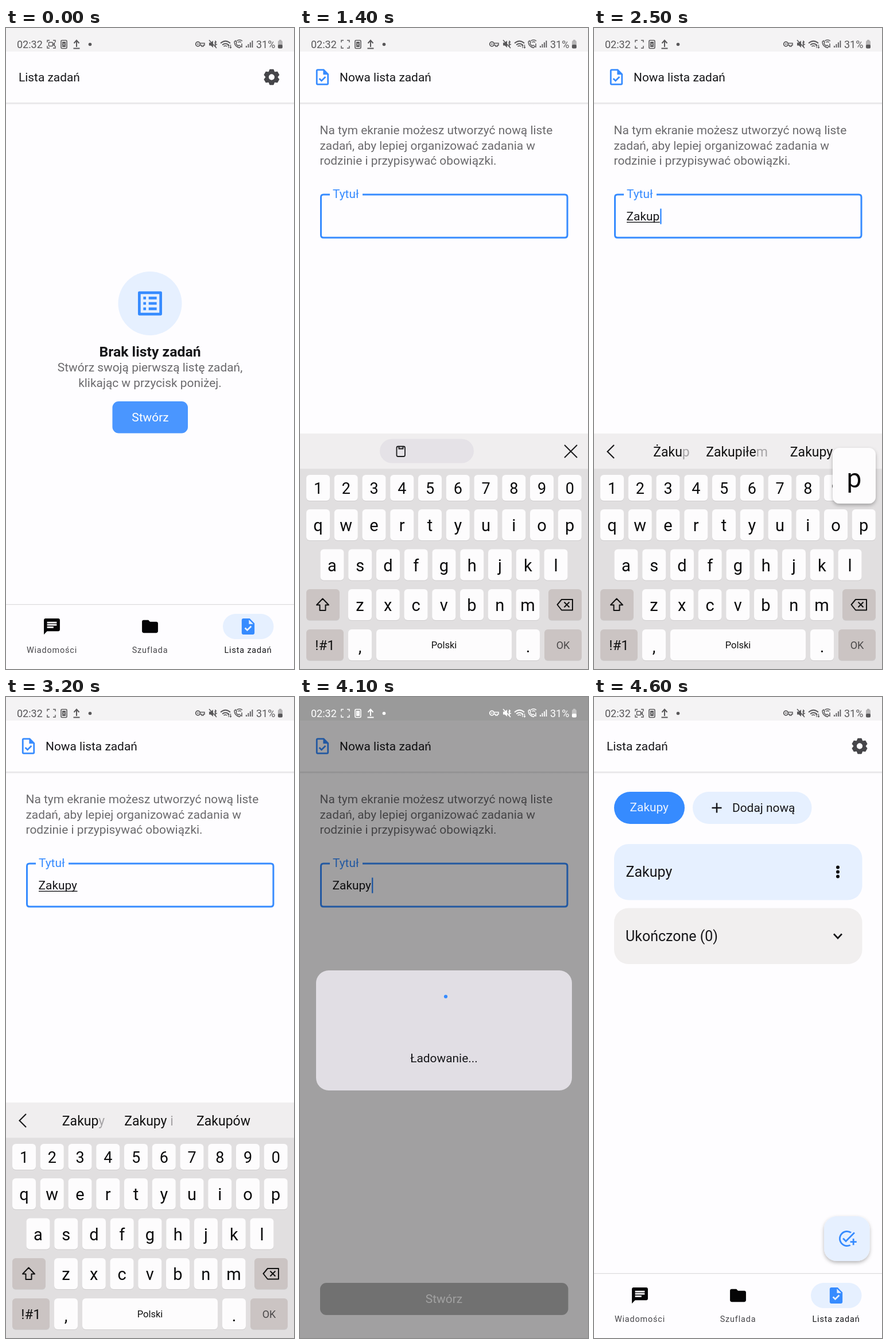
Animation of 502x1116 px, one loop 5.1 s. Source, as an HTML page:

```html
<!DOCTYPE html>
<html lang="pl">
<head>
<meta charset="utf-8">
<title>Lista zadań</title>
<style>
html, body { margin: 0; width: 100%; height: 100%; overflow: hidden; background: #fefdff; }
svg { display: block; width: 502px; height: 1116px; font-family: Roboto, sans-serif; }
</style>
</head>
<body>
<svg id="stage" viewBox="0 0 502 1116" xmlns="http://www.w3.org/2000/svg"></svg>
<script>
const LOOP = 5100;
const BLUE = '#368bff', PALE = '#e6f0ff', INK = '#17171a', PAPER = '#fefdff';

const rect = (x, y, w, h, r, fill, extra = '') =>
  `<rect x="${x}" y="${y}" width="${w}" height="${h}" rx="${r}" fill="${fill}" ${extra}/>`;
const text = (s, x, y, size, fill = INK, anchor = 'start', extra = '') =>
  `<text x="${x}" y="${y}" font-size="${size}" fill="${fill}" text-anchor="${anchor}" ${extra}>${s}</text>`;
const line = (d, width, stroke, extra = '') =>
  `<path d="${d}" fill="none" stroke="${stroke}" stroke-width="${width}" ${extra}/>`;
const icon = (d, cx, cy, fill, k = 1.394) =>
  `<path d="${d}" fill="${fill}" fill-rule="evenodd" transform="translate(${cx} ${cy}) scale(${k}) translate(-12 -12)"/>`;
const group = (id, body, extra = '') => `<g id="${id}" ${extra}>${body}</g>`;

const ICON = {
  chat: 'M20 2H4c-1.1 0-2 .9-2 2v18l4-4h14c1.1 0 2-.9 2-2V4c0-1.1-.9-2-2-2zM6 9h12v2H6zM14 14H6v-2h8zM18 8H6V6h12z',
  folder: 'M10 4H4c-1.1 0-2 .9-2 2v12c0 1.1.9 2 2 2h16c1.1 0 2-.9 2-2V8c0-1.1-.9-2-2-2h-8z',
  task: 'M14 2H6c-1.1 0-2 .9-2 2v16c0 1.1.9 2 2 2h12c1.1 0 2-.9 2-2V8zM10.94 18 7.4 14.46l1.41-1.41 2.12 2.12 4.24-4.24 1.41 1.41zM13 9V3.5L18.5 9z',
  taskLine: 'M14 2H6c-1.1 0-2 .9-2 2v16c0 1.1.9 2 2 2h12c1.1 0 2-.9 2-2V8zM18 20H6V4h7v5h5zM8.82 13.05 7.4 14.46 10.94 18l5.66-5.66-1.41-1.41-4.24 4.24z',
  list: 'M3.9 3h16.2q.9 0 .9.9v16.2q0 .9-.9.9H3.9q-.9 0-.9-.9V3.9q0-.9.9-.9zM5 5v14h14V5zM11 7h6v2h-6zM11 11h6v2h-6zM11 15h6v2h-6zM7 7h2v2H7zM7 11h2v2H7zM7 15h2v2H7z',
  addTask: 'M22 5.18 10.59 16.6l-4.24-4.24 1.41-1.41 2.83 2.83 10-10zM12 20a8 8 0 1 1 4.28-14.75l1.45-1.45A10 10 0 1 0 16.78 20.78l-1.5-1.5c-1 .46-2.11.72-3.28.72zM19 15h-3v2h3v3h2v-3h3v-2h-3v-3h-2z'
};

function gear(cx, cy) {
  const teeth = [...Array(6).keys()].map(i =>
    `<path d="M-5.4-7-3-13H3L5.4-7Z" transform="rotate(${i * 60})"/>`).join('');
  return `<g transform="translate(${cx} ${cy})" fill="#46464a" stroke="#46464a" stroke-width="1.4" stroke-linejoin="round">
    ${teeth}<circle r="7.6" fill="none" stroke-width="5.4"/><circle r="4.9" fill="${PAPER}" stroke="none"/></g>`;
}

const header = rect(0, 0, 502, 1116, 0, PAPER) + rect(0, 0, 502, 41, 0, '#f4f3f4') +
  rect(0, 130, 502, 5, 0, 'url(#shade)');

function statusBar() {
  const c = 'currentColor';
  const corners = 'M72 25V21.500H76M82 21.500H86V25M86 31V35H82M76 35H72V31';
  const bars = [0, 1, 2, 3].map(i => rect(418 + i * 3.5, 31 - i * 3, 1.8, 3 + i * 3, 0, c)).join('');
  return text('02:32', 19, 34.5, 18, c) + line(corners, 1.4, c) +
    group('camera', rect(74.500, 25, 7, 6.500, 1, 'none', `stroke="${c}" stroke-width="1.4"`) +
      line('M82 28.500 84.500 26V31Z', 1.2, c)) +
    rect(96, 21.500, 10, 14, 1.5, 'none', `stroke="${c}" stroke-width="1.6"`) +
    rect(98, 24, 6, 9, 0, c) + line('M99.500 26.500 102.500 30.500M102.500 26.500 99.500 30.500', 1, '#ddd') +
    line('M123 33V23M118.500 26.500 123 21.500 127.500 26.500M117.500 35.500H128.500', 2, c) +
    `<circle cx="146.500" cy="28.500" r="2.8" fill="${c}"/>` +
    `<circle cx="334.500" cy="28" r="3.8" fill="none" stroke="${c}" stroke-width="1.8"/>` +
    `<circle cx="334.500" cy="28" r="1.2" fill="${c}"/>` + line('M338 26.500H346V30H344V32H341V30H338', 1.5, c) +
    `<path d="M354 25.500H357L361 22V34L357 30.500H354Z" fill="${c}"/>` +
    line('M354 21 367 35M363.500 26 367 24M363.500 28.500H368M365 22V33', 1.6, c) +
    line('M374 26.500Q382.500 19 391 26.500M377 29.500Q382.500 25 388 29.500M379.500 32Q382.500 30 385 32', 1.7, c) +
    line('M388 35V29M386.500 31 388 29 389.500 31M391.500 29V35M390 33 391.500 35 393 33', 1.1, c) +
    line('M398 24Q398 32 407 34.500L409.500 32 406.500 30 404.500 31Q402 29.500 401 27L402 25 400 22Z', 1.5, c, 'stroke-linejoin="round"') +
    line('M402 22.500Q407 19 412 22.500M404.500 25Q407 23 410 25M411 27V34', 1.5, c) + bars +
    text('31%', 436, 34.5, 18, c) +
    rect(474, 22, 8, 13.500, 2, c, 'opacity=".4"') + rect(476, 20.500, 4, 2, .5, c, 'opacity=".4"') +
    rect(474, 29, 8, 6.500, 2, c);
}

const navItem = (d, label, cx, fill, ink) => icon(d, cx, 1042, fill) +
  text(label, cx, 1088, 14.4, ink, 'middle', 'letter-spacing=".85"');

const listScreen = header + text('Lista zadań', 22, 93, 20.9) + gear(463, 85.5) +
  group('empty',
    `<circle cx="251" cy="479.500" r="55.500" fill="${PALE}"/>` + icon(ICON.list, 251, 479.5, BLUE, 2.33) +
    text('Brak listy zadań', 251, 572, 24.8, INK, 'middle', 'font-weight="700"') +
    text('Stwórz swoją pierwszą listę zadań,', 251, 598, 20.9, '#6b6a6d', 'middle') +
    text('klikając w przycisk poniżej.', 251, 624.5, 20.9, '#6b6a6d', 'middle') +
    rect(185.5, 650, 131.5, 55.5, 11, BLUE) + rect(185.5, 650, 131.5, 55.5, 11, '#fff', 'id="tapFirst"') +
    text('Stwórz', 251.5, 685, 20.9, '#fff', 'middle')) +
  group('lists',
    rect(35, 165, 123, 56, 28, BLUE) + text('Zakupy', 62.5, 199, 20.9, '#eaf2ff') +
    rect(172, 165, 207.5, 56, 28, PALE) + line('M205.500 193H222.500M214 184.500V201.500', 2.5, INK) +
    text('Dodaj nową', 241, 200, 20.9) +
    rect(35, 256, 432.5, 97.5, 25, PALE) + text('Zakupy', 55.5, 313, 25) +
    [296.500, 304.500, 312.500].map(y => `<circle cx="425" cy="${y}" r="3" fill="#0c0c0e"/>`).join('') +
    rect(35, 367.5, 432.5, 97.5, 25, '#f1efef') + text('Ukończone (0)', 55, 425, 25) +
    line('M418 412.500 425 420 432 412.500', 2.7, INK)) +
  group('fab', rect(401, 904, 79.5, 78, 22, PALE, 'filter="url(#lift)"') + icon(ICON.addTask, 441, 943, BLUE)) +
  rect(0, 1003, 502, 1.3, 0, '#dddcde') +
  navItem(ICON.chat, 'Wiadomości', 80, '#050506', '#47464a') +
  navItem(ICON.folder, 'Szuflada', 251, '#050506', '#47464a') +
  rect(378, 1020, 88.5, 44, 22, PALE) + navItem(ICON.task, 'Lista zadań', 422, BLUE, INK);

const intro = ['Na tym ekranie możesz utworzyć nową liste', 'zadań, aby lepiej organizować zadania w',
  'rodzinie i przypisywać obowiązki.'];
const formScreen = header + icon(ICON.taskLine, 39, 85.5, BLUE) + text('Nowa lista zadań', 69, 93, 20.9) +
  intro.map((s, i) => text(s, 34.5, 185 + i * 26.5, 20.9, '#6b6a6d')).join('') +
  line('M52 290H41Q36.500 290 36.500 294.500V360.500Q36.500 365 41 365H461.500Q466 365 466 360.500V294.500Q466 290 461.500 290H109', 3, BLUE) +
  text('Tytuł', 57, 296, 20.9, BLUE) + text('', 56.5, 335, 20.9, INK, 'start', 'id="title"') +
  rect(57, 337.5, 0, 1.4, 0, INK, 'id="underline"') + rect(0, 314.5, 2.4, 27, 0, BLUE, 'id="caret"') +
  rect(35, 1020, 432.5, 56, 11, BLUE, 'id="create"') + rect(35, 1020, 432.5, 56, 11, '#fff', 'id="tapCreate"') +
  text('Stwórz', 251, 1055, 20.9, '#fff', 'middle');

const STEP = 48.75, GREY_KEY = '#cbc4c3';
const rows = [['1234567890', 11, 778, 45], ['qwertyuiop', 11, 838, 54],
  ['asdfghjkl', 35.5, 907.5, 54], ['zxcvbnm', 84, 977, 54]];
const keyPlace = {};
const key = (x, y, w, h, fill = '#fdfcfd') =>
  rect(x, y + 1, w, h, 6, '#cfcdce') + rect(x, y, w, h, 6, fill);
function keyboard() {
  const letters = rows.map(([chars, x0, y, h], r) => [...chars].map((c, i) => {
    const x = x0 + STEP * i;
    keyPlace[c] = [x, y];
    return key(x, y, 41, h) + text(c, x + 20.5, y + (r ? 38 : 33), r ? 29 : 27, '#0b0b0c', 'middle', `class="letter" data-c="${c}"`);
  }).join('')).join('');
  return rect(0, 706, 502, 410, 0, '#e1dfe0') + rect(0, 706, 502, 61.5, 0, '#f0eeef') +
    group('clip', rect(139, 715.5, 164, 42, 21, '#e5e2e7') +
      rect(168.5, 728.5, 14.5, 17.5, 2.5, 'none', 'stroke="#1b1b1d" stroke-width="1.8"') +
      line('M172.500 728.500V732.500H179.500V728.500', 1.8, '#1b1b1d') +
      line('M461 726 483 748M483 726 461 748', 2, '#1b1b1d')) +
    group('hints', line('M35 726 23.500 737.500 35 749', 2.2, '#1b1b1d') +
      [135, 249, 379].map(x => text('', x, 746, 23, '#111', 'middle', 'class="hint"')).join('')) +
    letters + key(11, 977, 58, 54, GREY_KEY) + key(433, 977, 58, 54, GREY_KEY) +
    line('M39.500 993.500 50 1004.500H44.500V1014H34.500V1004.500H29Z', 2, '#111', 'id="shift" stroke-linejoin="round"') +
    line('M448.500 1004 456 995H475V1013.500H456ZM460.500 999.500 469.500 1008.500M469.500 999.500 460.500 1008.500', 2, '#111', 'stroke-linejoin="round"') +
    key(11, 1047, 65, 54, GREY_KEY) + text('!#1', 43.5, 1083, 24, '#111', 'middle') +
    key(84, 1047, 41, 54) + text(',', 104.5, 1087, 29, '#111', 'middle') +
    key(133, 1047, 236, 54) + text('Polski', 251, 1080, 16.5, '#111', 'middle') +
    key(377, 1047, 41, 54) + text('.', 397.5, 1087, 29, '#111', 'middle') +
    key(426, 1047, 65, 54, GREY_KEY) + text('OK', 458.5, 1081, 18, '#4a4849', 'middle') +
    group('popup', rect(0, 0, 75, 97, 12, '#fdfcfd', 'filter="url(#lift)"') +
      text('', 37.5, 68.5, 46, '#0b0b0c', 'middle', 'id="popupChar"'));
}

const dialog = rect(28, 476, 446, 209, 22, '#e1dee4') + `<circle cx="254" cy="521.500" r="3.100" fill="${BLUE}"/>` +
  text('Ładowanie...', 251, 609, 20.9, INK, 'middle', 'id="ghost" opacity=".35"') +
  text('Ładowanie...', 251, 636, 20.9, INK, 'middle');

const stage = document.getElementById('stage');
stage.innerHTML = `<defs>
  <linearGradient id="shade" x2="0" y2="1"><stop stop-color="#d9d8da"/><stop offset="1" stop-color="#fefdff" stop-opacity="0"/></linearGradient>
  <filter id="lift" x="-20%" y="-20%" width="140%" height="150%"><feDropShadow dx="0" dy="3" stdDeviation="3" flood-opacity=".28"/></filter>
  </defs>` + group('listView', listScreen) + group('formView', formScreen) + group('keyboard', keyboard()) +
  rect(0, 0, 502, 1116, 0, '#000', 'id="scrim"') + group('dialog', dialog) + group('status', statusBar());

const el = {};
stage.querySelectorAll('[id]').forEach(n => el[n.id] = n);
const letters = [...stage.querySelectorAll('.letter')];
const hints = [...stage.querySelectorAll('.hint')];

const WORD = 'Zakupy';
const typedAt = [1500, 1700, 1900, 2200, 2500, 2700];
const presses = [['z', 1200, 1400], ['a', 1600, 1800], ['k', 1900, 2000],
  ['u', 2100, 2300], ['p', 2400, 2600], ['y', 2600, 2700]];
const hintWords = [[], ['Z', 'Za', 'Że'], ['Za', 'Zaraz', 'Zawsze'], ['Żak', 'Zakupy', 'Zakup'],
  ['Żaku', 'Zakupy', 'Zakup'], ['Żakup', 'Zakupiłem', 'Zakupy'], ['Zakupy', 'Zakupy i', 'Zakupów']];
const recordOff = [[100, 600], [1200, 1600], [2100, 2600], [3200, 3600], [4100, 4600]];

const ramp = (t, a, b) => Math.min(1, Math.max(0, (t - a) / (b - a)));
const ease = p => p * p * (3 - 2 * p);
const within = (t, a, b) => t >= a && t < b;
const show = (node, on) => node.setAttribute('display', on ? 'inline' : 'none');
const fade = (node, o) => { node.setAttribute('opacity', o); show(node, o > 0); };

function drawForm(t) {
  const count = typedAt.filter(at => t >= at).length;
  el.title.textContent = WORD.slice(0, count);
  const width = count ? el.title.getComputedTextLength() : 0;
  el.underline.setAttribute('width', width);
  show(el.underline, t < 3400);
  el.caret.setAttribute('x', 57.5 + width);
  const blinkStart = count ? typedAt[count - 1] : 900;
  show(el.caret, t >= 900 && Math.floor((t - blinkStart) / 500) % 2 === 0);
  el.create.setAttribute('fill', count && t < 4000 ? BLUE : '#b3b3b3');
  fade(el.tapCreate, t < 4000 ? .16 * ramp(t, 3750, 3950) : 0);
  return count;
}

function drawKeyboard(t, count) {
  const hidden = 1 - ease(ramp(t, 850, 1100)) + ease(ramp(t, 3350, 3580));
  show(el.keyboard, hidden < 1);
  el.keyboard.setAttribute('transform', `translate(0 ${410 * hidden})`);
  const caps = t < 1400;
  letters.forEach(n => n.textContent = caps ? n.dataset.c.toUpperCase() : n.dataset.c);
  el.shift.setAttribute('fill', caps ? '#111' : 'none');
  show(el.clip, !count);
  show(el.hints, count);
  const words = hintWords[count === 6 && t < 2900 ? 5 : count];
  hints.forEach((n, i) => {
    const word = words[i] || '', cut = i < 2 && word.length > 4 ? -1 : word.length;
    n.innerHTML = `${word.slice(0, cut)}<tspan fill="#a5a3a5">${word.slice(cut)}</tspan>`;
  });
  const press = presses.find(([, a, b]) => within(t, a, b));
  show(el.popup, press);
  if (press) {
    const [x, y] = keyPlace[press[0]];
    el.popup.setAttribute('transform', `translate(${Math.min(416, Math.max(11, x - 17))} ${y - 107})`);
    el.popupChar.textContent = caps ? press[0].toUpperCase() : press[0];
  }
}

function draw(t) {
  fade(el.formView, ease(ramp(t, 560, 800)) - ease(ramp(t, 4130, 4280)));
  show(el.empty, t < 2000);
  show(el.fab, t > 2000);
  show(el.lists, t >= 4400);
  fade(el.tapFirst, .1 * (1 - ramp(t, 0, 200)));
  drawKeyboard(t, drawForm(t));

  fade(el.scrim, .37 * (ramp(t, 3930, 4080) - ramp(t, 4280, 4510)));
  fade(el.dialog, ramp(t, 3940, 4080) - ramp(t, 4225, 4525));
  el.dialog.setAttribute('transform', `translate(0 ${-6 * ramp(t, 4130, 4280)})`);
  show(el.ghost, t >= 4200);
  el.status.setAttribute('color', within(t, 4000, 4200) ? '#fff' : '#59585a');
  show(el.camera, !recordOff.some(([a, b]) => within(t, a, b)));
}

const start = performance.now();
function frame() {
  draw((performance.now() - start) % LOOP);
  requestAnimationFrame(frame);
}
frame();
</script>
</body>
</html>
```
